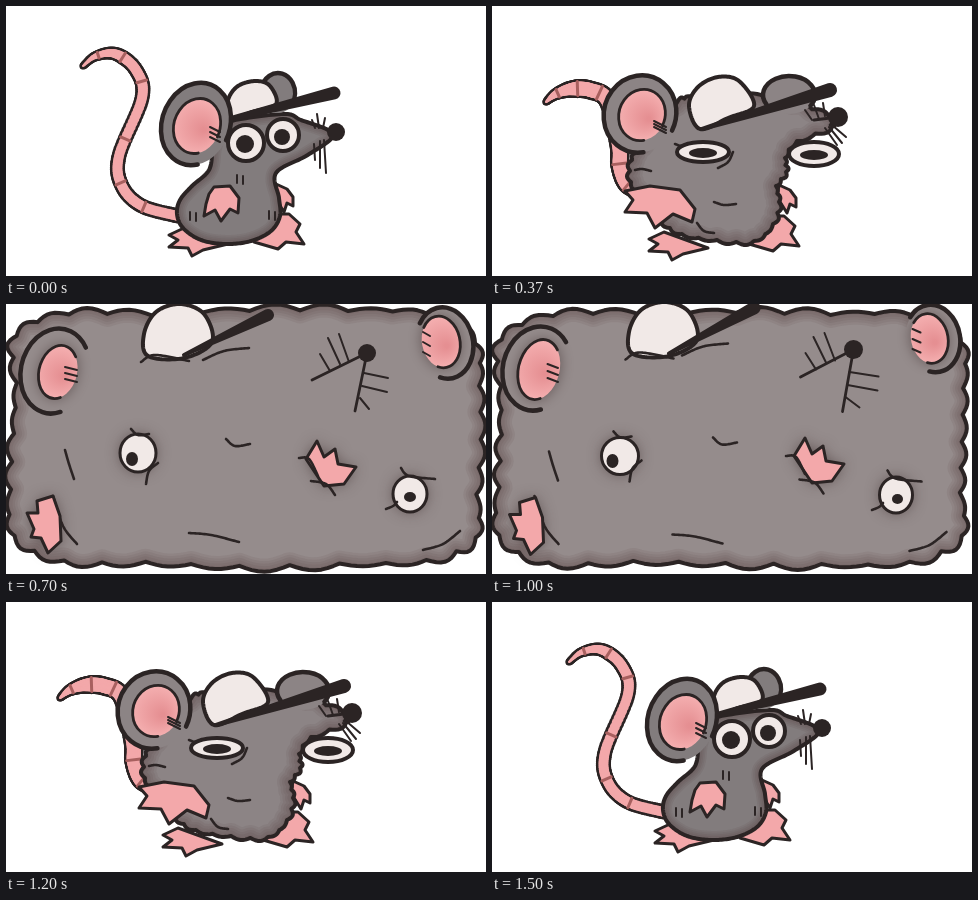
These frames come from a looping animation (480x270 px, 1.54 s). An HTML page with a canvas:

```html
<!DOCTYPE html>
<html>
<head>
<meta charset="utf-8">
<style>
html, body { margin: 0; width: 100%; height: 100%; overflow: hidden; background: #fff; }
canvas { display: block; }
</style>
</head>
<body>
<canvas id="stage" width="480" height="270"></canvas>
<script>
const ctx = document.getElementById('stage').getContext('2d');
const INK = '#2b2424', PINK = '#f3a8aa', CREAM = '#f1e9e7';
const LOOP = 1540, TURN = 2 * Math.PI;

// [start time, pose]: 0 mouse, 1 lump, 2 and 3 filling the stage
const STEPS = [[0, 0], [160, .25], [230, .5], [300, .75], [370, 1], [410, 1.35], [450, 1.7],
  [500, 2], [540, 2.4], [580, 2.7], [700, 3], [1000, 2.5], [1080, 2], [1160, 1.5],
  [1200, 1], [1250, .75], [1330, .5], [1410, .25], [1500, 0]];

const clamp = (v, lo, hi) => Math.max(lo, Math.min(hi, v));
const shift = (pts, dx, dy) => pts.map((v, i) => v + (i % 2 ? dy : dx));

// Nearly rectangular outline with slightly wavering sides
function block(cx, cy, w, h, seed) {
  return Array.from({ length: 40 }, (_, j) => {
    const a = -2.5 + (j >> 1) * TURN / 20, waver = 3 * Math.sin(j * 2.3 + seed);
    return waver + (j % 2 ? cy + h * clamp(1.33 * Math.sin(a), -1, 1)
                          : cx + w * clamp(1.33 * Math.cos(a), -1, 1));
  });
}

const mouseBody = [213,125, 225,115, 278,108, 295,114, 322,124, 325,133, 300,150, 270,167, 273,192, 274,210,
  265,225, 245,235, 220,238, 195,234, 177,222, 171,208, 174,194, 186,180, 203,164, 207,142];
const lumpBody = [184,98, 205,92, 272,90, 300,96, 337,111, 340,121, 305,135, 293,152, 294,166, 284,180,
  287,196, 281,218, 262,235, 225,234, 190,228, 168,214, 152,194, 139,176, 140,154, 150,138];
const body = [mouseBody, lumpBody, block(238, 135, 229, 123, 0), block(240, 134, 232, 125, 2)];

const tail = [
  [77,60, 90,50, 110,48, 130,64, 136,92, 113,150, 116,180, 136,200, 172,210],
  [54,96, 64,88, 80,83, 98,84, 116,95, 127,140, 128,160, 135,178, 150,185]
];
const footL = [178,222, 163,229, 172,234, 163,241, 182,242, 186,250, 197,244, 222,238];
const footR = [262,208, 283,208, 294,218, 290,226, 298,238, 280,236, 272,243, 248,236];
const leftFoot = [footL, shift(footL, -6, 4)];
const rightFoot = [footR, shift(footR, 9, 2)];

const clawL = [48,240, 35,252, 28,237, 18,236, 21,228, 14,212, 25,212, 24,200, 40,195, 47,215];
const leftHand = [
  [233,192, 232,207, 224,203, 215,215, 209,204, 198,210, 200,198, 203,188, 208,181, 224,180],
  [203,203, 200,216, 181,208, 163,222, 155,207, 133,206, 141,194, 133,185, 158,180, 188,184],
  clawL, shift(clawL, 7, -3)
];
const handR = [270,178, 281,183, 287,191, 287,200, 281,197, 278,206, 273,198, 268,190];
const clawR = [304,149, 315,131, 322,147, 333,139, 336,154, 354,157, 342,174, 322,176];
const rightHand = [handR, shift(handR, 17, 1), clawR, shift(clawR, -4, 6)];

const bigDome = [140,48, 136,26, 148,4, 172,-4, 196,6, 204,34, 176,50];
const dome = [
  [222,113, 222,94, 232,80, 250,75, 264,80, 270,98, 246,106],
  [208,123, 197,100, 206,81, 226,71, 247,75, 262,100, 236,112],
  bigDome, shift(bigDome, 2, 4)
];
// ends, then the radius at each
const brim = [[220,114, 328,87, 2.5,6.5], [210,123, 338,84, 2,7], [176,48, 262,-3, 2,7], [178,51, 262,11, 2,6]];

// x, y, rx, ry, tilt, outline start and end, then x, y, rx, ry of the pink
const leftEar = [
  [190,118, 34,42, .35, 1.1,6.4, 191,120, 23,28],
  [148,108, 36,39, .35, 1.1,6.4, 150,109, 23,26],
  [41,62, 34,42, .25, 1.2,5.3, 42,63, 22,34],
  [49,67, 34,43, .25, 1.1,5.5, 52,68, 19,27]
];
const rightEar = [
  [272,87, 17,20, 0, -3.68,.6, 272,87, 0,0],
  [297,89, 26,19, 0, -3.68,.6, 297,89, 0,0],
  [443,30, 26,32, -.2, -2.2,1.9, 440,31, 18,24],
  [439,39, 28,36, -.2, -2.4,2, 435,38, 19,26]
];
// x, y, rx, ry of the white, then of the pupil
const leftEye = [[240,137, 18,18, 239,138, 9,9], [211,146, 26,10, 211,147, 14,5],
  [124,155, 19,18, 115,159, 6,7], [132,149, 18,19, 126,155, 6,7]];
const rightEye = [[277,129, 16,16, 276,131, 8,8], [322,148, 25,12, 322,149, 14,5],
  [404,192, 16,18, 407,197, 5,5], [404,190, 17,18, 404,193, 6,5]];
const nose = [[330,126, 9], [346,111, 10], [362,42, 10], [361,49, 9]];

const bigWhiskers = [313,48, 324,64, 321,32, 334,57, 332,28, 343,55, 357,67, 391,71, 355,80, 390,85, 353,92, 372,102];
const whiskers = [
  [306,114, 309,122, 311,108, 313,122, 319,112, 317,122, 308,138, 309,154, 314,135, 314,162, 318,134, 320,167],
  [313,104, 320,114, 322,99, 327,113, 331,97, 333,110, 333,122, 345,139, 337,121, 350,137, 340,119, 354,131],
  bigWhiskers,
  bigWhiskers.map((v, i) => i % 4 < 2 ? v + (i % 2 ? 2 : 1) : v + (i % 2 ? 3 : -9 * (i > 12)))
];
const spokes = [[322,124, 325,131], [322,114, 338,119], [311,70, 352,108], [306,76, 349,107]];

// x, y, dx, dy and gap of three hairs
const leftHairs = [[204,121, 10,5, 5], [162,115, 12,6, 3], [52,57, 9,5, 8], [59,63, 12,3, 6]];
const rightHairs = [[424,22, 9,3, 10], [417,28, 7,4, 10]];
const ticks = [[231,169], [263,205], [184,206]];
const lumpFolds = [[143,164, 150,163, 159,165], [222,196, 232,199, 244,198], [183,138, 190,140, 196,137],
  [241,146, 236,156, 226,162], [205,217, 212,225, 222,227]];
// three points, then how far the fold moves between the large poses
const folds = [
  [222,132, 231,139, 246,137, -2,3],
  [55,149, 59,163, 64,178, 4,-3],
  [178,232, 200,234, 228,241, 5,-3],
  [418,248, 438,242, 455,229, -1,-2],
  [118,130, 125,136, 136,135, 7,-5],
  [147,154, 138,162, 135,175, 5,5],
  [396,169, 404,177, 430,180, -1,-5],
  [380,207, 387,204, 391,200, 0,-2],
  [183,47, 204,38, 229,35, 14,9],
  [132,53, 146,46, 180,52, 3,5],
  [295,150, 305,151, 314,168, -2,4],
  [310,174, 325,177, 334,188, -5,3],
  [38,192, 48,222, 62,240, 9,0]
];

let pose = 0;

function at(poses, p = pose) {
  const i = Math.floor(p), last = poses.length - 1;
  const a = poses[Math.min(i, last)], b = poses[Math.min(i + 1, last)];
  return a.map((v, j) => v + (b[j] - v) * (p - i));
}

// Catmull-Rom samples, optionally with rounded bumps pushed outward
function spline(pts, closed, bump = 0) {
  const n = pts.length / 2, out = [];
  const pick = i => {
    const k = closed ? (i + n) % n : clamp(i, 0, n - 1);
    return [pts[2 * k], pts[2 * k + 1]];
  };
  for (let i = 0; i < (closed ? n : n - 1); i++) {
    const [a, b, c, d] = [-1, 0, 1, 2].map(k => pick(i + k));
    const dx = c[0] - b[0], dy = c[1] - b[1], len = Math.hypot(dx, dy) || 1;
    for (let t = 0; t < 1; t += 1 / 16) {
      const [x, y] = [0, 1].map(k => b[k] + t / 2 * (c[k] - a[k] +
        t * (2 * a[k] - 5 * b[k] + 4 * c[k] - d[k] + t * (3 * (b[k] - c[k]) + d[k] - a[k]))));
      const h = bump * Math.abs(Math.sin(t * TURN)) * (1 + .35 * Math.sin(i * 2.7));
      out.push([x + dy / len * h, y - dx / len * h]);
    }
  }
  if (!closed) out.push(pick(n - 1));
  return out;
}

function trace(points, closed) {
  ctx.beginPath();
  points.forEach(([x, y]) => ctx.lineTo(x, y));
  if (closed) ctx.closePath();
}

function paint(fill, width) {
  if (fill) { ctx.fillStyle = fill; ctx.fill(); }
  if (width) { ctx.strokeStyle = INK; ctx.lineWidth = width; ctx.stroke(); }
}

function oval(x, y, rx, ry, fill, width, tilt = 0, from = 0, to = TURN) {
  ctx.beginPath();
  ctx.ellipse(x, y, rx, ry, tilt, from, to);
  paint(fill, width);
}

function lines(v, width) {
  ctx.beginPath();
  for (let i = 0; i < v.length; i += 4) {
    ctx.moveTo(v[i], v[i + 1]);
    ctx.lineTo(v[i + 2], v[i + 3]);
  }
  paint(null, width);
}

function hairs([x, y, dx, dy, gap]) {
  for (let i = 0; i < 3; i++) lines([x, y + gap * i, x + dx, y + gap * i + dy], 2);
}

function fold(pts) {
  trace(spline(pts));
  paint(null, 2.6);
}

// Soft dark halo around parts sunk into the large body
function halo(draw) {
  ctx.save();
  ctx.shadowColor = `rgba(55,38,38,${.55 * clamp(pose - 1, 0, 1)})`;
  ctx.shadowBlur = 14;
  draw();
  ctx.restore();
}

function paw(poses) {
  const v = at(poses), pts = [];
  for (let i = 0; i < v.length; i += 2) pts.push([v[i], v[i + 1]]);
  trace(pts, true);
  halo(() => paint(PINK));
  paint(null, 3);
}

function drawTail() {
  const pts = spline(at(tail)), n = pts.length;
  const radius = i => 1 + (4 + 2 * Math.min(1, pose)) * Math.min(1, i / n * 3.5);
  const tube = (extra, color) =>
    pts.forEach(([x, y], i) => oval(x, y, radius(i) + extra, radius(i) + extra, color));
  tube(2.6, INK);
  tube(0, PINK);
  ctx.strokeStyle = '#a8605f';
  ctx.lineWidth = 3;
  for (let i = 18; i < n - 4; i += 19) {
    const [x, y] = pts[i], [u, v] = pts[i + 1];
    const k = radius(i) / (Math.hypot(u - x, v - y) || 1);
    ctx.beginPath();
    ctx.moveTo(x - (v - y) * k, y + (u - x) * k);
    ctx.lineTo(x + (v - y) * k, y - (u - x) * k);
    ctx.stroke();
  }
}

function drawBody(grey) {
  trace(spline(at(body), true, 2.3 * Math.min(2, pose)), true);
  paint(grey);
  ctx.save();
  ctx.clip();
  ctx.strokeStyle = 'rgba(60,40,40,.07)';
  for (let w = 6; w <= 26; w += 5) {
    ctx.lineWidth = w * (pose < 1 ? .7 : 1);
    ctx.stroke();
  }
  ctx.restore();
  paint(null, 4);
}

function drawEar(poses, grey) {
  const [x, y, rx, ry, tilt, from, to, px, py, prx, pry] = at(poses);
  oval(x, y, rx, ry, grey, 0, tilt);
  oval(x, y, rx, ry, null, 4.5, tilt, from, to);
  if (prx < 2) return;
  const pink = ctx.createRadialGradient(px + prx * .3, py + 4, 2, px, py, pry);
  pink.addColorStop(0, '#e58f92');
  pink.addColorStop(1, '#f5b0b1');
  halo(() => oval(px, py, prx, pry, pink, 0, tilt));
  oval(px, py, prx, pry, null, 2.8, tilt, from, to);
}

function drawCap() {
  trace(spline(at(dome), true), true);
  paint(CREAM, 4);
  const [x, y, u, v, r, q] = at(brim);
  const a = Math.atan2(v - y, u - x), side = Math.PI / 2;
  ctx.beginPath();
  ctx.arc(x, y, r, a + side, a - side);
  ctx.arc(u, v, q, a - side, a + side);
  ctx.closePath();
  paint(INK);
}

function drawEye(poses) {
  const [x, y, rx, ry, px, py, prx, pry] = at(poses);
  halo(() => oval(x, y, rx, ry, CREAM));
  oval(x, y, rx, ry, null, pose < 1.5 ? 4 : 3);
  oval(px, py, prx, pry, INK);
}

function drawFolds() {
  if (pose > 1.4) {
    const p = Math.max(0, pose - 2);
    hairs(at(rightHairs, p));
    folds.forEach(f => fold(shift(f.slice(0, 6), f[6] * p, f[7] * p)));
  } else if (pose > .5) {
    lumpFolds.forEach(fold);
  } else {
    ticks.forEach(([x, y]) => lines([x, y, x, y + 8, x + 6, y + 1, x + 6, y + 9], 2));
  }
}

function draw() {
  ctx.fillStyle = '#fff';
  ctx.fillRect(0, 0, 480, 270);
  ctx.lineCap = ctx.lineJoin = 'round';
  const grey = `rgb(${at([[130, 124, 125], [140, 132, 133], [149, 140, 140]]).map(Math.round)})`;
  const big = pose > 1.4;

  if (!big) {
    drawTail();
    [leftFoot, rightFoot, rightHand].forEach(paw);
  }
  drawBody(grey);
  drawEar(rightEar, grey);
  drawCap();
  drawEar(leftEar, grey);
  hairs(at(leftHairs));
  drawEye(leftEye);
  drawEye(rightEye);
  if (big) paw(rightHand);
  drawFolds();
  paw(leftHand);
  lines(at(whiskers), 2);
  const [x, y, r] = at(nose), [a, b, c, d] = at(spokes);
  lines([a, b, x, y, c, d, x, y], 2.8);
  oval(x, y, r, r, INK);
}

function frame(now) {
  const t = now % LOOP;
  pose = STEPS.filter(s => s[0] <= t).pop()[1];
  draw();
  requestAnimationFrame(frame);
}
frame(0);
</script>
</body>
</html>
```
